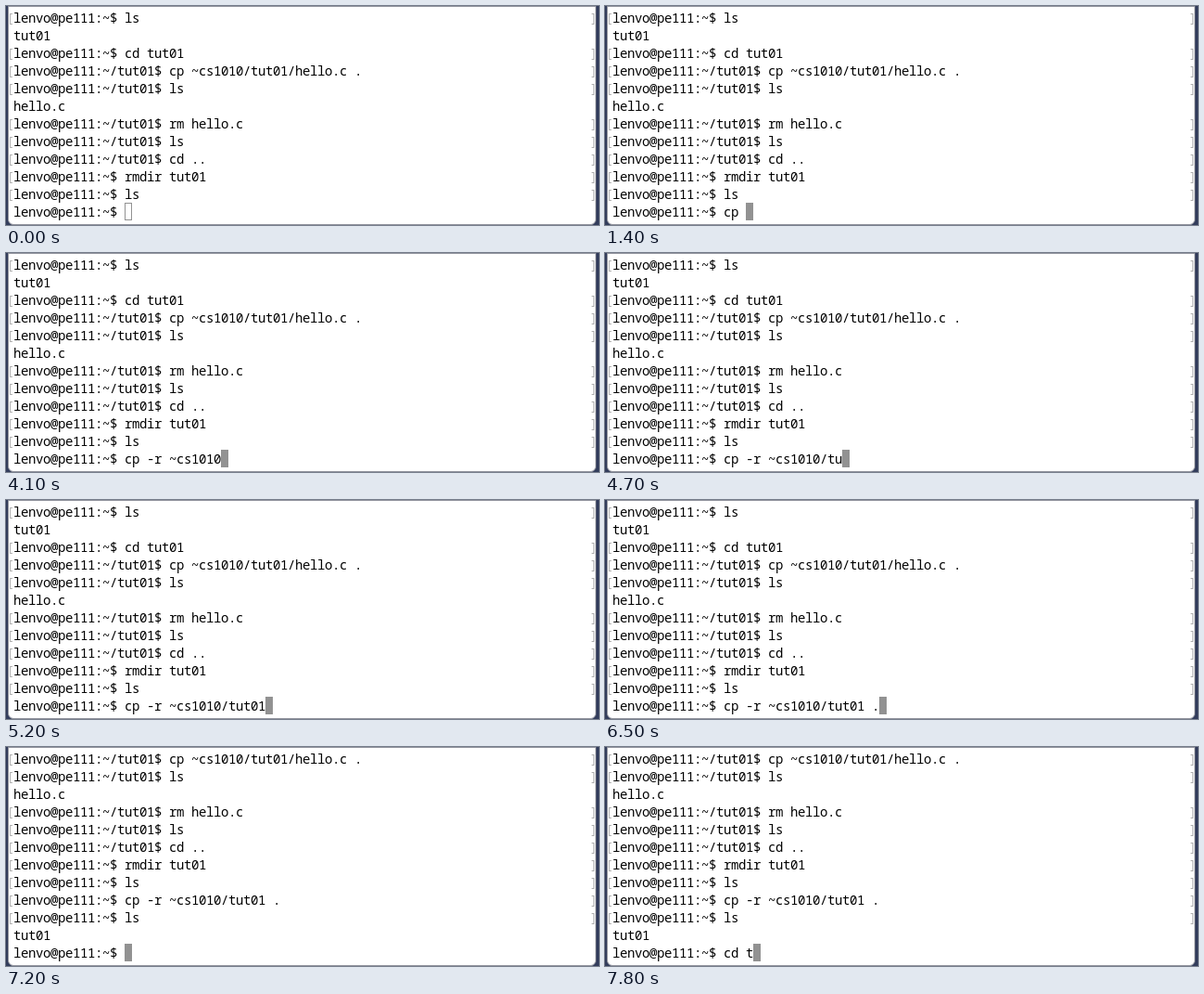
Recreate the animation shown at these times as an HTML page. Size 640x236 px, loop 8 s.

```html
<!DOCTYPE html>
<html lang="en">
<head>
<meta charset="utf-8">
<title>Terminal session</title>
<style>
  html, body { margin: 0; width: 100%; height: 100%; overflow: hidden; background: #333d5c; }
  #window {
    position: absolute; left: 2px; top: 0; width: 635px; height: 236px;
    box-sizing: border-box; border: 1px solid #94969f;
    border-radius: 0 0 6px 6px; background: #fff; overflow: hidden;
  }
  #screen {
    position: absolute; left: 5px; top: 2px; width: 623px;
    font: 500 14px/19px "Noto Sans Mono", "DejaVu Sans Mono", monospace;
    letter-spacing: -.4px;
    font-variant-ligatures: none; color: #000; white-space: pre;
  }
  .row { position: relative; height: 19px; }
  .entered::before, .entered::after {
    content: ""; position: absolute; top: 5px; width: 3px; height: 12px;
    box-sizing: border-box; border: 1px solid #b4b4b4;
  }
  .entered::before { left: -4px; border-right: 0; }
  .entered::after { left: 624px; border-left: 0; }
  .cursor {
    display: inline-block; width: 8px; height: 19px; vertical-align: top;
    box-sizing: border-box; background: #929292;
  }
  .cursor.hollow { background: none; border: 1px solid #929292; }
</style>
</head>
<body>
<div id="window"><div id="screen"></div></div>
<script>
const DURATION = 8000, ROWS = 12, FOCUS_TIME = 100;
const HOME = "lenvo@pe111:~$ ", FOLDER = "lenvo@pe111:~/tut01$ ";
const entered = text => ({ text, entered: true });
const output = text => ({ text, entered: false });

const history = [
  entered(HOME + "ls"),
  output("tut01"),
  entered(HOME + "cd tut01"),
  entered(FOLDER + "cp ~cs1010/tut01/hello.c ."),
  entered(FOLDER + "ls"),
  output("hello.c"),
  entered(FOLDER + "rm hello.c"),
  entered(FOLDER + "ls"),
  entered(FOLDER + "cd .."),
  entered(HOME + "rmdir tut01"),
  entered(HOME + "ls")
];

// Each key burst is [time, typed text]; a command with an end time is then run.
const commands = [
  { keys: [[1400, "cp "], [1800, "-"], [2000, "r"], [2200, " "], [3100, "~"],
           [3500, "cs"], [3900, "10"], [4100, "10"], [4400, "/"], [4600, "t"],
           [4700, "u"], [4800, "t"], [5000, "0"], [5200, "1"], [6100, " "], [6200, "."]],
    end: 6600, result: [] },
  { keys: [[6900, "l"], [7000, "s"]], end: 7200, result: ["tut01"] },
  { keys: [[7600, "c"], [7700, "d "], [7800, "t"]], end: Infinity, result: [] }
];

const screen = document.getElementById("screen");
let shown = "";

function linesAt(time) {
  const lines = [...history];
  for (const { keys, end, result } of commands) {
    const typed = keys.filter(([at]) => at <= time).map(([, text]) => text).join("");
    if (time < end) {
      lines.push(output(HOME + typed));
      break;
    }
    lines.push(entered(HOME + typed), ...result.map(output));
  }
  return lines.slice(-ROWS);
}

function draw(now) {
  const time = now % DURATION;
  const lines = linesAt(time), focused = time >= FOCUS_TIME;
  const state = focused + lines.map(line => line.text).join("\n");
  if (state !== shown) {
    shown = state;
    screen.replaceChildren(...lines.map(line => {
      const row = document.createElement("div");
      row.className = line.entered ? "row entered" : "row";
      row.textContent = line.text;
      return row;
    }));
    const cursor = document.createElement("span");
    cursor.className = focused ? "cursor" : "cursor hollow";
    screen.lastChild.append(cursor);
  }
}

const start = performance.now();
function tick() {
  draw(performance.now() - start);
  requestAnimationFrame(tick);
}
tick();
</script>
</body>
</html>
```
